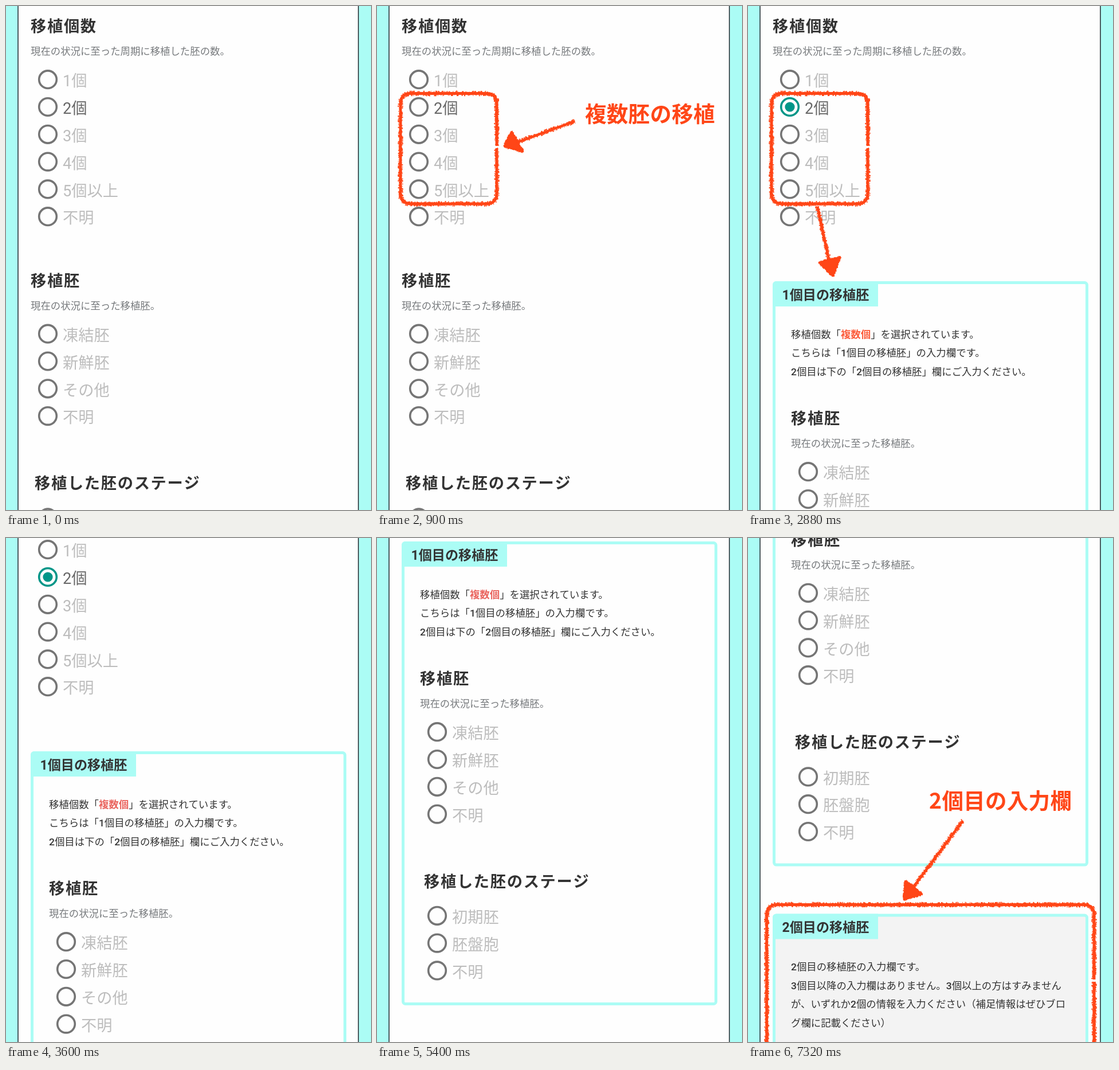
Animation of 637 by 879 pixels, one loop 8000 ms. Source, as an HTML page with a canvas:

```html
<!DOCTYPE html>
<html lang="ja">
<head>
<meta charset="utf-8">
<title>移植個数フォーム</title>
<style>
html, body { margin: 0; width: 100%; height: 100%; overflow: hidden; background: #fefefe; }
canvas { display: block; width: 637px; height: 879px; }
</style>
</head>
<body>
<canvas id="stage" width="637" height="879"></canvas>
<script>
const W = 637, H = 879, LOOP = 8000;
const ctx = document.getElementById('stage').getContext('2d');
const CJK = '"Noto Sans CJK JP", "Noto Sans CJK", sans-serif';
const SANS = 'Roboto, ' + CJK;
const CYAN = '#abfcf5', PAGE = '#fefefe', INK = '#333', GREY = '#777a7d';
const PALE = '#bdbdbd', RING = '#757575', TEAL = '#009688', RED = '#ff4617';

// Scroll is the page offset from the top view.
const scenes = [
  { at: 0, scroll: 0 },
  { at: 900, scroll: 0, note: noteMany },
  { at: 1800, scroll: 0, picked: true, note: noteOpen, accent: '#fc5d3c' },
  { at: 3600, scroll: 108, picked: true, accent: '#ea655f' },
  { at: 4500, scroll: 326, picked: true, accent: '#ea655f' },
  { at: 5400, scroll: 474, picked: true, accent: '#ea655f' },
  { at: 6300, scroll: 716.4, picked: true, accent: '#ea655f', note: noteSecond }
];

// Text placed by the vertical middle of its ideographs.
function text(str, x, mid, size, color, { weight = 400, gap = 0, family = SANS } = {}) {
  ctx.font = `${weight} ${size}px ${family}`;
  ctx.letterSpacing = gap + 'px';
  ctx.fillStyle = color;
  ctx.fillText(str, x, mid + size * 0.375);
  return x + ctx.measureText(str).width;
}

const heading = (str, x, y) => text(str, x, y, 27.2, INK, { weight: 700, gap: 1.75 });
const small = (str, x, y, color = INK, weight = 500) => text(str, x, y, 17.4, color, { weight });

function radio(x, y, label, on, color = PALE) {
  ctx.strokeStyle = on ? TEAL : RING;
  ctx.lineWidth = 3.6;
  ctx.beginPath();
  ctx.arc(x, y, 15.3, 0, Math.PI * 2);
  ctx.stroke();
  if (on) {
    ctx.fillStyle = TEAL;
    ctx.beginPath();
    ctx.arc(x, y, 8.6, 0, Math.PI * 2);
    ctx.fill();
  }
  text(label, x + 26, y + 2, 27.2, color);
}

function radios(x, y, labels) {
  labels.forEach((label, i) => radio(x, y + i * 47.8, label));
}

function embryoSection(x, y) {
  heading('移植胚', x, y);
  small('現在の状況に至った移植胚。', x, y + 43.9, GREY);
  radios(x + 30, y + 93.2, ['凍結胚', '新鮮胚', 'その他', '不明']);
  heading('移植した胚のステージ', x + 7, y + 353.5);
  radios(x + 30, y + 413.8, ['初期胚', '胚盤胞', '不明']);
}

function panel(y, title, fill) {
  ctx.fillStyle = fill;
  ctx.strokeStyle = CYAN;
  ctx.lineWidth = 5;
  ctx.beginPath();
  ctx.roundRect(45.5, y + 2.5, 546, 804, 4);
  ctx.fill();
  ctx.stroke();
  ctx.fillStyle = CYAN;
  ctx.beginPath();
  ctx.roundRect(43, y, 184, 44, [6, 0, 0, 0]);
  ctx.fill();
  text(title, 59.5, y + 23, 23.1, INK, { weight: 700 });
}

function firstPanel(y, accent) {
  panel(y, '1個目の移植胚', PAGE);
  let x = small('移植個数「', 75, y + 92);
  x = small('複数個', x, y + 92, accent, 600);
  small('」を選択されています。', x, y + 92);
  small('こちらは「1個目の移植胚」の入力欄です。', 75, y + 124.5);
  small('2個目は下の「2個目の移植胚」欄にご入力ください。', 75, y + 157);
  embryoSection(75, y + 239);
}

function secondPanel(y) {
  panel(y, '2個目の移植胚', '#f3f3f3');
  ['2個目の移植胚の入力欄です。',
   '3個目以降の入力欄はありません。3個以上の方はすみません',
   'が、いずれか2個の情報を入力ください（補足情報はぜひブロ',
   'グ欄に記載ください）'
  ].forEach((line, i) => small(line, 75, y + 92 + i * 32.6));
}

function page(scene) {
  ctx.fillStyle = CYAN;
  ctx.fillRect(0, 0, W, H);
  ctx.fillStyle = PAGE;
  ctx.fillRect(21, 0, 594, H);
  ctx.fillStyle = '#4b5c60';
  ctx.fillRect(20, 0, 2, H);
  ctx.fillRect(614, 0, 2, H);

  const top = -scene.scroll;
  heading('移植個数', 43, top + 35);
  small('現在の状況に至った周期に移植した胚の数。', 43, top + 78.4, GREY);
  ['1個', '2個', '3個', '4個', '5個以上', '不明'].forEach((label, i) => {
    const two = i === 1;
    radio(73, top + 128.2 + i * 47.8, label, two && scene.picked, two ? '#686868' : PALE);
  });
  if (scene.picked) {
    firstPanel(top + 480, scene.accent);
    secondPanel(top + 1372);
  } else {
    embryoSection(43, top + 478.5);
  }
}

function seeded(seed) {
  return () => (seed = (seed * 16807) % 2147483647) / 2147483647;
}

// Crayon line: a solid core with grains scattered over its edges.
function crayon(points, width, seed) {
  const rnd = seeded(seed);
  ctx.strokeStyle = ctx.fillStyle = RED;
  ctx.lineWidth = width * 0.62;
  ctx.lineCap = 'butt';
  ctx.lineJoin = 'round';
  ctx.beginPath();
  points.forEach(([x, y]) => ctx.lineTo(x, y));
  ctx.stroke();
  for (let i = 1; i < points.length; i++) {
    const [x0, y0] = points[i - 1], [x1, y1] = points[i];
    const dx = x1 - x0, dy = y1 - y0, len = Math.hypot(dx, dy);
    for (let n = 0; n < len * 2.4; n++) {
      const t = rnd(), off = (rnd() - 0.5) * width, s = 0.9 + rnd() * 1.3;
      ctx.fillRect(x0 + dx * t - dy / len * off - s / 2, y0 + dy * t + dx / len * off - s / 2, s, s);
    }
  }
}

// Rounded loop starting and ending at a small gap on the right side.
function crayonBox(l, t, r, b, gapY, seed) {
  const rad = 16, pts = [[r, gapY + 2]];
  [[r, b, 0], [l, b, 1], [l, t, 2], [r, t, 3]].forEach(([x, y, q]) => {
    const cx = x === r ? r - rad : l + rad, cy = y === b ? b - rad : t + rad;
    for (let k = 0; k <= 6; k++) {
      const a = (q + k / 6) * Math.PI / 2;
      pts.push([cx + rad * Math.cos(a), cy + rad * Math.sin(a)]);
    }
  });
  pts.push([r, gapY - 2]);
  crayon(pts, 7.8, seed);
}

function arrow(from, to, head, seed) {
  crayon([from, to], 7.2, seed);
  ctx.fillStyle = RED;
  ctx.beginPath();
  head.forEach(([x, y]) => ctx.lineTo(x, y));
  ctx.fill();
  crayon([...head, head[0]], 4, seed + 5);
}

function caption(str, x, y) {
  text(str, x, y, 37.5, RED, { weight: 700, gap: 0.3, family: CJK });
}

function choiceBox() {
  crayonBox(41, 152.5, 209, 345, 246, 71);
}

function noteMany() {
  choiceBox();
  arrow([345, 201], [244, 238], [[235, 219], [222, 245], [255, 254]], 19);
  caption('複数胚の移植', 363, 188.2);
}

function noteOpen() {
  choiceBox();
  arrow([121, 350], [142, 446], [[124, 447], [161, 438], [148, 471]], 37);
}

function noteSecond() {
  crayonBox(32.7, 639.5, 604, 1400, 772, 53);
  arrow([375, 493], [287, 611], [[275, 598], [272, 631], [304, 621]], 83);
  caption('2個目の入力欄', 316, 458);
}

function draw(now) {
  const t = now % LOOP;
  const scene = scenes.findLast(s => s.at <= t) || scenes[0];
  page(scene);
  if (scene.note) scene.note();
  requestAnimationFrame(draw);
}
requestAnimationFrame(draw);
</script>
</body>
</html>
```
